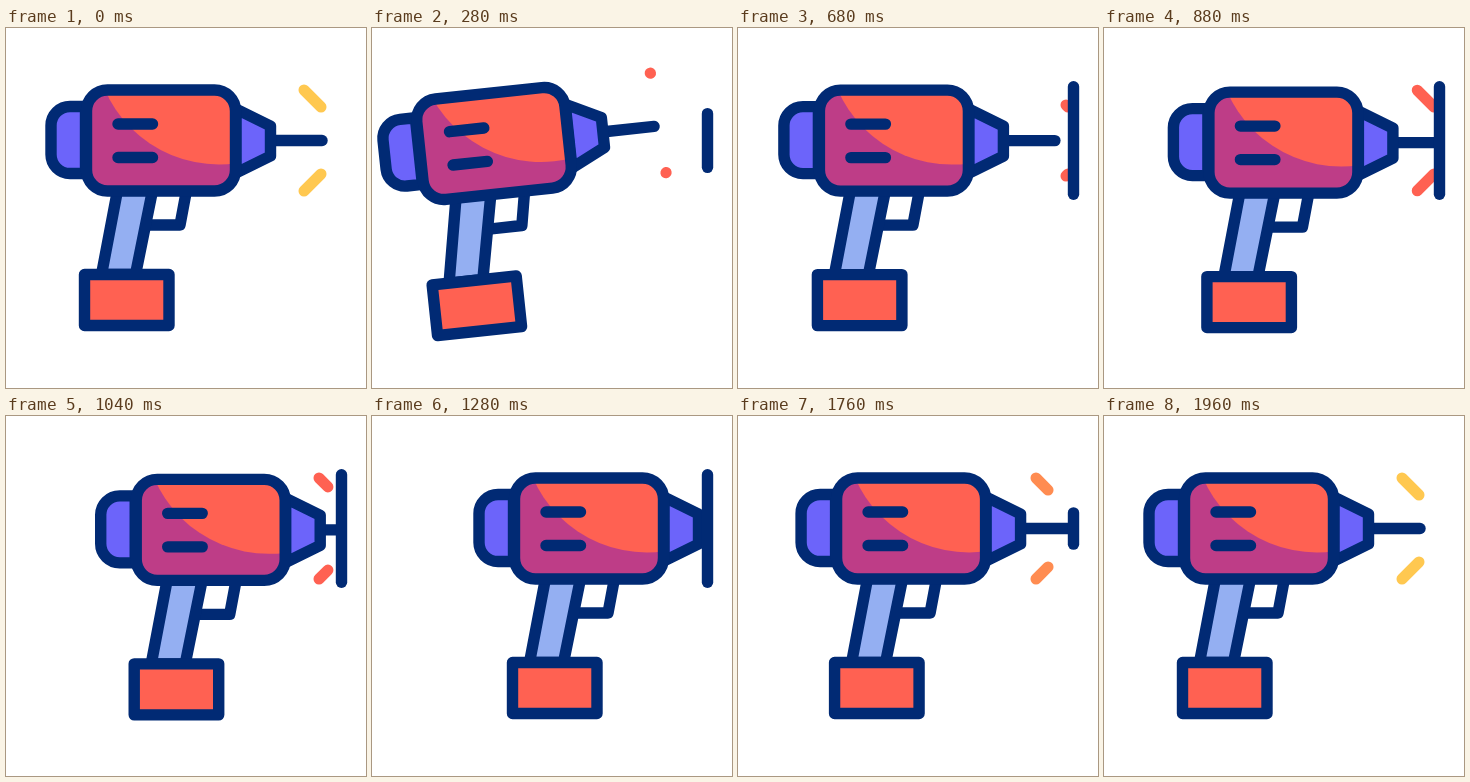
An HTML page for the animation above (2 s loop, 360 by 360 pixels).

```html
<!DOCTYPE html>
<html lang="en">
<head>
<meta charset="utf-8">
<title>Drill</title>
<style>
  html, body { margin: 0; height: 100%; overflow: hidden; background: #fff; }
  svg { display: block; width: 100vw; height: 100vh; }
  .ink { stroke: #012a74; stroke-width: 11.4; stroke-linecap: round; stroke-linejoin: round; fill: none; }
  .spark { stroke-width: 11; stroke-linecap: round; fill: none; }
  .red { fill: #ff6152; }
  .plum { fill: #be3d87; }
  .violet { fill: #6c64fa; }
  .sky { fill: #94aff2; }
</style>
</head>
<body>
<svg viewBox="0 0 360 360">
  <defs>
    <clipPath id="room"><rect width="335" height="360"/></clipPath>
    <clipPath id="shell"><rect x="80.5" y="62" width="149" height="101" rx="21"/></clipPath>
  </defs>
  <g clip-path="url(#room)">
    <path id="sparks" class="spark"/>
    <g id="drill">
      <path class="ink violet" d="M79.5 78.5H64a19 19 0 0 0-19 19V126.500a19 19 0 0 0 19 19H79.5Z"/>
      <path class="ink" d="M180 165L174 197H141"/>
      <path class="ink sky" d="M111 165L95.500 246.500H129.500L146 165"/>
      <rect class="ink red" x="78.500" y="246.500" width="84.500" height="51"/>
      <path class="ink" d="M266 112.500H316"/>
      <path class="ink violet" d="M230 81L264.500 98V128L230 145Z"/>
      <g clip-path="url(#shell)">
        <rect class="plum" x="75" y="56" width="160" height="112"/>
        <circle class="red" cx="213" cy="12" r="124.500"/>
      </g>
      <rect class="ink" x="80.500" y="62" width="149" height="101" rx="21"/>
      <path class="ink" d="M112 96H146.500M112 129.500H146.500"/>
    </g>
  </g>
  <path id="wall" class="ink"/>
</svg>
<script>
  const LOOP = 2000, STEP = 40, MID = 112.5;
  const RED = [255, 97, 82], YELLOW = [255, 200, 80];
  const [drill, sparks, wall] = ["drill", "sparks", "wall"].map(id => document.getElementById(id));

  const part = (t, from, to) => Math.min(1, Math.max(0, (t - from) / (to - from)));
  const ease = (t, from, to) => {
    const u = part(t, from, to);
    return u * u * (3 - 2 * u);
  };

  // Mirrored pair of diagonal strokes between two distances from the outer end.
  function sparkPath(x, a, b) {
    const line = side => {
      const at = d => `${x + d} ${MID + side * (50.5 - d)}`;
      return `M${at(a)}L${at(b + 0.01)}`;
    };
    return line(-1) + line(1);
  }

  function drawSparks(t) {
    const size = 17;
    let path = "", turn = 0, heat = 1;
    if (t < 300 || t > 1400) {
      const length = t < 300 ? 1 - ease(t, 40, 300) : ease(t, 1400, 1960);
      path = sparkPath(298, 0, size * length);
      turn = t < 300 ? ease(t, 40, 340) * -10 : 0;
      heat = t < 300 ? ease(t, 40, 280) : 1 - ease(t, 1600, 1960);
    } else if (t > 620 && t < 1200) {
      const head = ease(t, 620, 900), tail = ease(t, 890, 1200);
      path = sparkPath(313, size * (1 - head), size * (1 - tail));
    }
    const rgb = YELLOW.map((c, i) => Math.round(c + (RED[i] - c) * heat));
    sparks.setAttribute("d", path);
    sparks.setAttribute("stroke", `rgb(${rgb})`);
    sparks.setAttribute("transform", `rotate(${turn} 180 180)`);
  }

  function draw(t) {
    const windup = ease(t, 40, 340) - ease(t, 340, 640);
    const push = ease(t, 640, 1200) - ease(t, 1400, 1960);
    const dip = 2.2 * Math.sin(Math.PI * part(t, 640, 1200)) ** 2;
    drill.setAttribute("transform",
      `translate(${62 * push - 29 * windup} ${dip}) rotate(${-6.8 * windup} 180 180)`);

    const half = 53.7 * (ease(t, 40, 520) - ease(t, 1400, 1960));
    wall.setAttribute("d", half > 0.01 ? `M335.5 ${MID - half}V${MID + half}` : "");
    drawSparks(t);
  }

  const start = performance.now();
  function tick() {
    const t = (performance.now() - start) % LOOP;
    draw(Math.floor(t / STEP) * STEP);
    requestAnimationFrame(tick);
  }
  tick();
</script>
</body>
</html>
```
